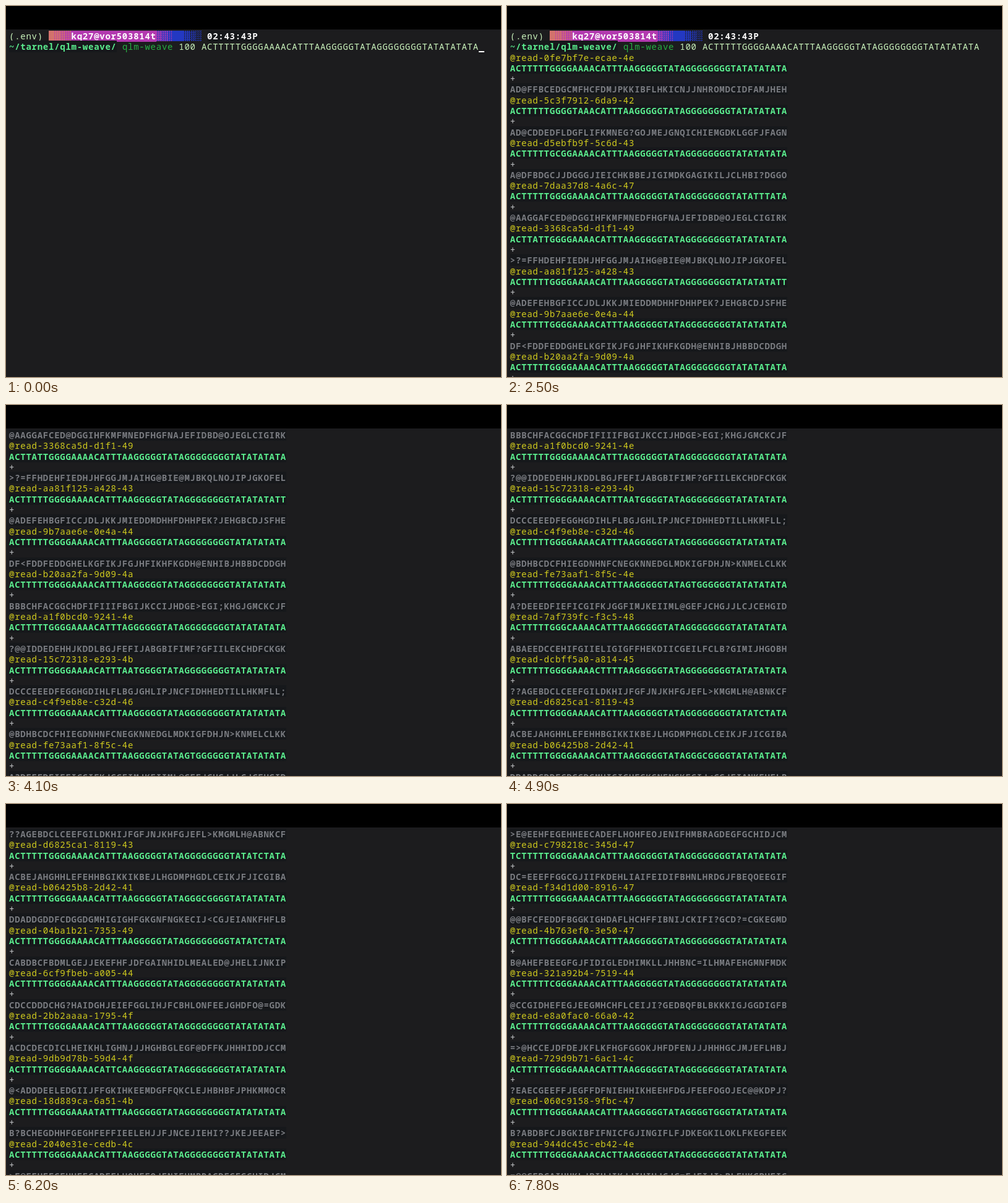
An HTML page that plays this animation: 800x601 px, repeating every 7.9 s.

```html
<!DOCTYPE html>
<html lang="en">
<head>
<meta charset="utf-8">
<title>Simulated reads</title>
<style>
html, body { margin: 0; width: 100%; height: 100%; overflow: hidden; background: #1c1c1e; }
#bar { position: absolute; width: 100%; height: 38px; background: #000; }
#term {
  --cell: 9.143px; --row: 17.3px;
  position: absolute; inset: 39.5px 0 0 5px; overflow: hidden; contain: strict; white-space: pre;
  font: 14px/var(--row) "Noto Sans Mono", "DejaVu Sans Mono", monospace;
  letter-spacing: calc(var(--cell) - 8.4px);
  font-variant-ligatures: none; color: #c9f2bb;
}
#term div { height: var(--row); }
#term b { font-weight: 600; background: #16181b; }
.seq, .path { color: #5bed8e; }
.qual { color: #797b80; }
.id { color: #d0cb1e; }
.plus { color: #c4c6c8; }
.cmd { color: #27b044; }
#term .user { color: #fff; background: #b33ab0; }
#term .time { color: #fff; }
i { display: inline-block; width: var(--cell); height: var(--row); vertical-align: top; background-size: 3px 3px; }
.cursor { background: linear-gradient(#fff, #fff) bottom / 100% 2px no-repeat; }
</style>
</head>
<body>
<div id="bar"></div>
<div id="term"></div>
<script>
const TEMPLATE = 'ACTTTTTGGGGAAAACATTTAAGGGGGTATAGGGGGGGGTATATATATA';

// Each line: id, quality, and optionally a substitution (position + base).
const READS = `
0fe7bf7e-ecae-4e AD@FFBCEDGCMFHCFDMJPKKIBFLHKICNJJNHROMDCIDFAMJHEH
5c3f7912-6da9-42 AD@CDDEDFLDGFLIFKMNEG?GOJMEJGNQICHIEMGDKLGGFJFAGN 11T
d5ebfb9f-5c6d-43 A@DFBDGCJJDGGGJIEICHKBBEJIGIMDKGAGIKILJCLHBI?DGGO 8C
7daa37d8-4a6c-47 @AAGGAFCED@DGGIHFKMFMNEDFHGFNAJEFIDBD@OJEGLCIGIRK 44T
3368ca5d-d1f1-49 >?=FFHDEHFIEDHJHFGGJMJAIHG@BIE@MJBKQLNOJIPJGKOFEL 4A
aa81f125-a428-43 @ADEFEHBGFICCJDLJKKJMIEDDMDHHFDHHPEK?JEHGBCDJSFHE 48T
9b7aae6e-0e4a-44 DF<FDDFEDDGHELKGFIKJFGJHFIKHFKGDH@ENHIBJHBBDCDDGH
b20aa2fa-9d09-4a BBBCHFACGGCHDFIFIIIFBGIJKCCIJHDGE>EGI;KHGJGMCKCJF
a1f0bcd0-9241-4e ?@@IDDEDEHHJKDDLBGJFEFIJABGBIFIMF?GFIILEKCHDFCKGK 21G
15c72318-e293-4b DCCCEEEDFEGGHGDIHLFLBGJGHLIPJNCFIDHHEDTILLHKMFLL; 22T
c4f9eb8e-c32d-46 @BDHBCDCFHIEGDNHNFCNEGKNNEDGLMDKIGFDHJN>KNMELCLKK
fe73aaf1-8f5c-4e A?DEEEDFIEFICGIFKJGGFIMJKEIIML@GEFJCHGJJLCJCEHGID 32T
7af739fc-f3c5-48 ABAEEDCCEHIFGIIELIGIGFFHEKDIICGEILFCLB?GIMIJHGOBH 10C
dcbff5a0-a814-45 ??AGEBDCLCEEFGILDKHIJFGFJNJKHFGJEFL>KMGMLH@ABNKCF 16T
d6825ca1-8119-43 ACBEJAHGHHLEFEHHBGIKKIKBEJLHGDMPHGDLCEIKJFJICGIBA 44C
b06425b8-2d42-41 DDADDGDDFCDGGDGMHIGIGHFGKGNFNGKECIJ<CGJEIANKFHFLB 34C
04ba1b21-7353-49 CABDBCFBDMLGEJJEKEFHFJDFGAINHIDLMEALED@JHELIJNKIP 44C
6cf9fbeb-a005-44 CDCCDDDCHG?HAIDGHJEIEFGGLIHJFCBHLONFEEJGHDFO@=GDK
2bb2aaaa-1795-4f ACDCDECDICLHEIKHLIGHNJJJHGHBGLEGF@DFFKJHHHIDDJCCM
9db9d78b-59d4-4f @<ADDDEELEDGIIJFFGKIHKEEMDGFFQKCLEJHBHBFJPHKMMOCR 19C
18d889ca-6a51-4b B?BCHEGDHHFGEGHFEFFIEELEHJJFJNCEJIEHI??JKEJEEAEF> 15T
2040e31e-cedb-4c >E@EEHFEGEHHEECADEFLHOHFEOJENIFHMBRAGDEGFGCHIDJCM
c798218c-345d-47 DC=EEEFFGGCGJIIFKDEHLIAIFEIDIFBHNLHRDGJFBEQOEEGIF 0T
f34d1d00-8916-47 @@BFCFEDDFBGGKIGHDAFLHCHFFIBNIJCKIFI?GCD?=CGKEGMD
4b763ef0-3e50-47 B@AHEFBEEGFGJFIDIGLEDHIMKLLJHHBNC=ILHMAFEHGMNFMDK
321a92b4-7519-44 @CCGIDHEFEGJEEGMHCHFLCEIJI?GEDBQFBLBKKKIGJGGDIGFB 7C
e8a0fac0-66a0-42 =>@HCCEJDFDEJKFLKFHGFGGOKJHFDFENJJJHHHGCJMJEFLHBJ
729d9b71-6ac1-4c ?EAECGEEFFJEGFFDFNIEHHIKHEEHFDGJFEEFOGOJEC@@KDPJ?
060c9158-9fbc-47 B?ABDBFCJBGKIBFIFNICFGJINGIFLFJDKEGKILOKLFKEGFEEK 35T
944dc45c-eb42-4e =@@GEDCAIHHKLJPIHJIKJJIHIHJCJC=EJEIJI>BLEHKCPHEIC 17C`.trim().split('\n');

const LOOP = 7900, TICK = 100;
const ENTER = 600, READ_START = 540, READ_PERIOD = 205;
const TERM_ROWS = 54, VISIBLE_ROWS = 33;
const CORAL = '#d3726c', PINK = '#b33ab0', BLUE = '#2338c2', DARK = '#1c1c1e';
const CURSOR = '<i class="cursor"></i>';

const escape = s => s.replace(/</g, '&lt;').replace(/>/g, '&gt;');
const span = (tag, cls, text) => `<${tag} class="${cls}">${escape(text)}</${tag}>`;

// Shaded cell: level 0-4 quarters of ink over paper.
function shade(ink, paper, level) {
  const quarters = [0, 2, 1, 3].map((rank, q) =>
    `${rank < level ? ink : paper} ${q * 25}% ${q * 25 + 25}%`);
  return `<i style="background-image:conic-gradient(${quarters})"></i>`;
}
const shades = (ink, paper, levels) => levels.map(l => shade(ink, paper, l)).join('');

function readRows(line) {
  const [id, quality, change] = line.split(' ');
  const bases = [...TEMPLATE];
  if (change) bases[parseInt(change)] = change.at(-1);
  return [
    span('span', 'id', '@read-' + id),
    span('b', 'seq', bases.join('')),
    span('span', 'plus', '+'),
    span('b', 'qual', quality),
  ];
}

const rows = [
  '(.env) ' + shades(CORAL, PINK, [4, 3, 2, 1]) + span('b', 'user', 'kq27@vor503814t') +
    shades(BLUE, PINK, [1, 2, 3]) + shades(BLUE, DARK, [4, 4, 3, 2, 1]) +
    ' ' + span('b', 'time', '02:43:43P'),
  span('b', 'path', '~/tarnel/qlm-weave/') + ' ' + span('span', 'cmd', 'qlm-weave') + ' 100 ' + TEMPLATE,
  ...READS.flatMap(readRows),
];

const term = document.getElementById('term');
let shown;

function draw() {
  const t = Math.floor(performance.now() % LOOP / TICK) * TICK;
  const reads = Math.max(0, Math.floor((t - READ_START) / READ_PERIOD));
  const entered = t >= ENTER;
  const state = entered ? reads : -1;
  if (state !== shown) {
    shown = state;
    const end = 2 + 4 * reads;
    const scroll = Math.max(0, end - TERM_ROWS + 1);
    const lines = rows.slice(0, end);
    if (entered) lines[end] = CURSOR;
    else lines[1] += CURSOR;
    // Rows past the last listed read stay empty below the visible area.
    term.innerHTML = lines.slice(scroll, scroll + VISIBLE_ROWS)
      .map(line => `<div>${line || ''}</div>`).join('');
  }
  requestAnimationFrame(draw);
}
draw();
</script>
</body>
</html>
```
